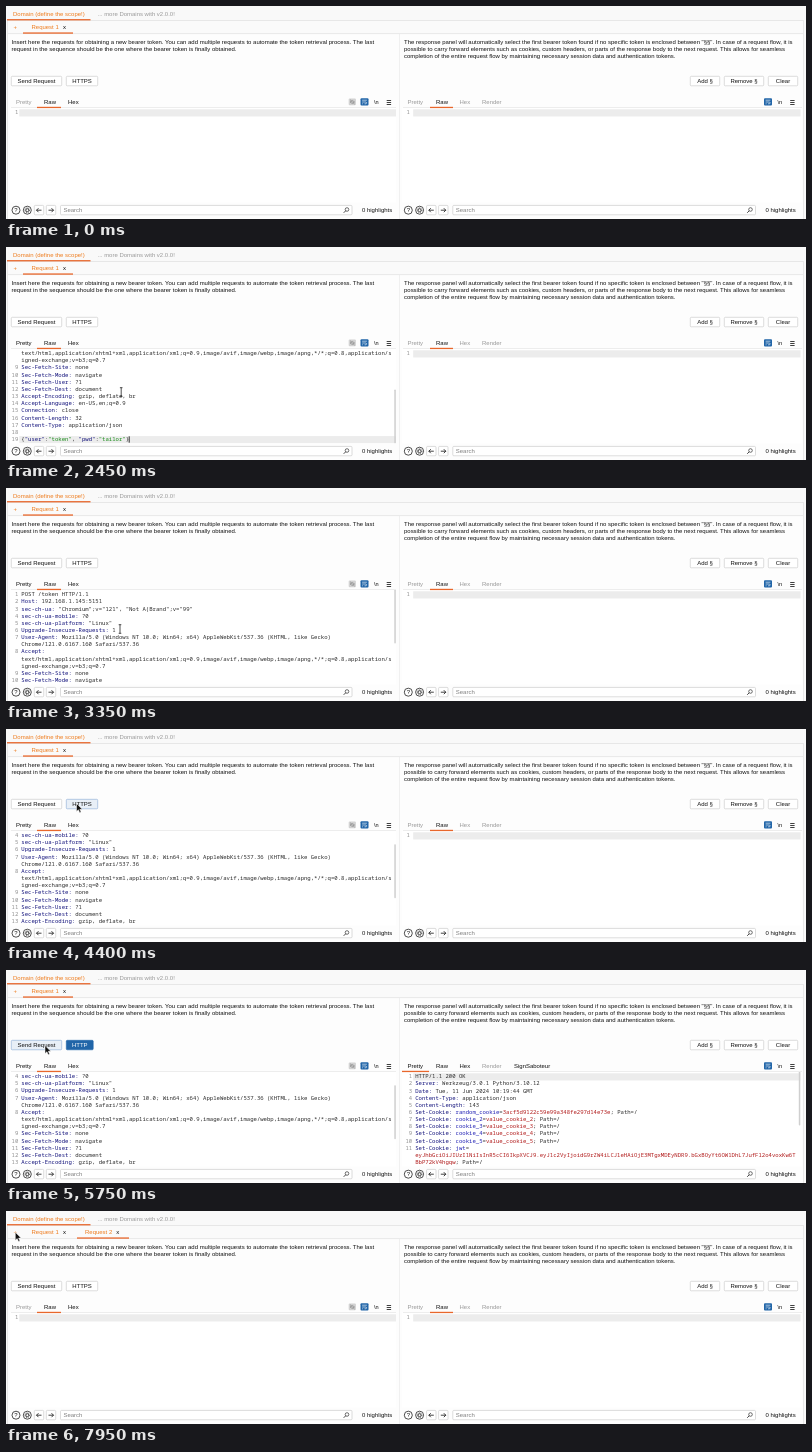
Write an HTML page that moves like this. It is 800 px wide and 213 px high and loops after 8000 ms.

```html
<!DOCTYPE html>
<html lang="en">
<head>
<meta charset="utf-8">
<title>Token request panel</title>
<style>
html, body { margin: 0; width: 100%; height: 100%; overflow: hidden; background: #fafafa; }
svg { display: block; width: 100vw; height: 100vh; }
text { font: 5.97px "Liberation Sans", Arial, sans-serif; fill: #111; white-space: pre; }
.code text { font: 5.61px "Noto Sans Mono", monospace; fill: #2a2a2a; }
.code .num { fill: #8c8c8c; text-anchor: end; }
.code .name { fill: #10107a; }
.code .key { fill: #2020b4; }
.code .val { fill: #b01818; }
.code .str { fill: #168a16; }
.plain .json tspan { fill: #2a2a2a; }
.mid { text-anchor: middle; }
</style>
</head>
<body>
<svg id="stage" viewBox="0 0 800 213" preserveAspectRatio="none">
  <clipPath id="leftClip"><rect x="4" y="102" width="386" height="94.5"/></clipPath>
  <clipPath id="rightClip"><rect x="396" y="102" width="400" height="94.5"/></clipPath>
</svg>
<script>
const LOOP = 8000, STEP = 50, ROW = 7.15, TOP = 101.5, VIEW = 95;
const ORANGE = '#e8672c', LABEL = '#ee7b1c', DARK = '#111', FADED = '#999', BLUE = '#2165a8', EDGE = '#c4c4c4';
const stage = document.getElementById('stage');

function add(tag, attrs, parent = stage) {
  const node = document.createElementNS('http://www.w3.org/2000/svg', tag);
  set(node, attrs);
  parent.appendChild(node);
  return node;
}
function set(node, attrs) {
  for (const k in attrs) node.setAttribute(k, attrs[k]);
}
function show(node, on) {
  node.style.display = on ? '' : 'none';
}
function label(x, y, str, fill = DARK, parent = stage, cls = '') {
  const node = add('text', { x, y, class: cls, style: `fill:${fill}` }, parent);
  node.textContent = str;
  return node;
}
function box(x, y, width, height, fill, stroke = 'none', parent = stage, rx = 0) {
  return add('rect', { x, y, width, height, fill, stroke, rx, 'stroke-width': 0.6 }, parent);
}
function line(d, stroke = DARK, width = 0.7, parent = stage) {
  return add('path', { d, stroke, fill: 'none', 'stroke-width': width }, parent);
}
function button(x, w, str) {
  const g = add('g', {});
  const face = box(x + 0.3, 70.3, w - 0.6, 9.5, '#fff', EDGE, g, 1);
  const text = label(x + w / 2, 77.2, str, DARK, g, 'mid');
  return { g, face, text };
}
function paint(btn, over, focused) {
  set(btn.face, { fill: over ? '#e8eff7' : '#fff', stroke: over || focused ? '#86a8d4' : EDGE });
}

// Page frame and the two rows of tabs
box(0, 0, 800, 213, '#f9f9f9');
box(1.5, 14.5, 796, 200, '#fafafa', '#dcdcdc');
box(2, 28, 795, 186, '#fdfdfd');
line('M2 27.6H797', '#dedede', 0.6);
line('M393.5 28V213', '#eaeaea', 0.7);
label(7, 9.8, 'Domain (define the scope!)', LABEL);
label(91.5, 9.8, '... more Domains with v2.0.0!', FADED);
box(1, 13.1, 83.5, 1.3, ORANGE);
label(7.6, 22.7, '+', LABEL);
label(25.5, 22.7, 'Request 1', LABEL);
label(57, 22.7, 'x');
const mark = box(17, 26.4, 50, 1.3, ORANGE);
const second = add('g', {});
label(79, 22.7, 'Request 2', LABEL, second);
label(110.3, 22.7, 'x', DARK, second);

// Introductory text
[
  'Insert here the requests for obtaining a new bearer token. You can add multiple requests to automate the token retrieval process. The last',
  'request in the sequence should be the one where the bearer token is finally obtained.'
].forEach((s, i) => label(5.5, 37.6 + i * 7.1, s));
[
  'The response panel will automatically select the first bearer token found if no specific token is enclosed between "§§". In case of a request flow, it is',
  'possible to carry forward elements such as cookies, custom headers, or parts of the response body to the next request. This allows for seamless',
  'completion of the entire request flow by maintaining necessary session data and authentication tokens.'
].forEach((s, i) => label(398, 37.6 + i * 7.1, s));

const send = button(5, 51, 'Send Request');
const https = button(60, 32, 'HTTPS');
const http = button(60, 27.5, 'HTTP');
set(http.face, { fill: BLUE, stroke: BLUE });
http.text.style.fill = '#fff';
button(684, 30, 'Add §');
button(718, 40, 'Remove §');
button(762, 30, 'Clear');

// Editors and their tabs
box(4, 101.5, 386, 95, '#fff');
box(396, 101.5, 400, 95, '#fff');
line('M5 101.5H390M397 101.5H796', '#e2e2e2', 0.6);
const prettyReq = label(10, 98.2, 'Pretty');
label(38, 98.2, 'Raw');
label(62, 98.2, 'Hex');
box(31, 100.8, 24, 1.3, ORANGE);
const prettyRes = label(401.5, 98.2, 'Pretty');
label(430, 98.2, 'Raw');
const hexRes = label(453.5, 98.2, 'Hex');
label(476, 98.2, 'Render', FADED);
const extraTab = label(508, 98.2, 'SignSaboteur');
const resMark = box(424, 100.8, 23, 1.3, ORANGE);

function viewIcons(x) {
  box(x - 4, 92.3, 8, 7.2, BLUE, 'none', stage, 1);
  line(`M${x - 2.4} 94.2h4.8m-4.8 1.8h4q1.3 .9 0 1.8h-1.6m-2.4 0h1`, '#fff', 0.6);
  label(x + 9.4, 98, '\\n').style.fontSize = '5.6px';
  line(`M${x + 22.2} 94.5h4.4m-4.4 2h4.4m-4.4 2h4.4`, DARK, 0.8);
}
viewIcons(358.5);
viewIcons(762);
box(342.7, 92.5, 7.2, 6.8, '#d2d2d2', 'none', stage, 1);
line('M344 96q2.3 -3 4.6 0q-2.3 3 -4.6 0M344 93.6l4.7 4.6', '#7d7d7d', 0.6);

// Bottom bars
function footer(x, end) {
  for (const cx of [x + 10, x + 21.3])
    add('circle', { cx, cy: 204.2, r: 4, fill: '#fff', stroke: '#222', 'stroke-width': 0.8 });
  label(x + 10, 206.4, '?', DARK, stage, 'mid');
  add('circle', { cx: x + 21.3, cy: 204.2, r: 1.5, fill: 'none', stroke: '#222', 'stroke-width': 0.8 });
  add('circle', { cx: x + 21.3, cy: 204.2, r: 2.3, fill: 'none', stroke: '#222', 'stroke-width': 0.8, 'stroke-dasharray': '.9 .9' });
  for (const [cx, dir] of [[x + 33, -1], [x + 45, 1]]) {
    box(cx - 4.7, 199.4, 9.4, 9.4, '#fff', EDGE, stage, 1);
    line(`M${cx - 2.5 * dir} 204.2h${5 * dir}m${-2 * dir} -2l${2 * dir} 2l${-2 * dir} 2`, DARK, 0.8);
  }
  box(x + 54.5, 199.4, end - x - 54.5, 9.4, '#fff', EDGE, stage, 1);
  label(x + 57.5, 206.3, 'Search', '#7f7f7f');
  add('circle', { cx: end - 5, cy: 203.5, r: 1.8, fill: 'none', stroke: '#333', 'stroke-width': 0.7 });
  line(`M${end - 6.3} 204.8l-2 2`, '#333', 0.9);
  label(end + 10, 206.3, '0 highlights');
}
footer(0, 346);
footer(392.3, 749.5);

// Code rows: a line break marks where a long line wraps
const request = [
  'POST /token HTTP/1.1',
  'Host: 192.168.1.145:5151',
  'sec-ch-ua: "Chromium";v="121", "Not A(Brand";v="99"',
  'sec-ch-ua-mobile: ?0',
  'sec-ch-ua-platform: "Linux"',
  'Upgrade-Insecure-Requests: 1',
  'User-Agent: Mozilla/5.0 (Windows NT 10.0; Win64; x64) AppleWebKit/537.36 (KHTML, like Gecko)\nChrome/121.0.6167.160 Safari/537.36',
  'Accept:\ntext/html,application/xhtml+xml,application/xml;q=0.9,image/avif,image/webp,image/apng,*/*;q=0.8,application/s\nigned-exchange;v=b3;q=0.7',
  'Sec-Fetch-Site: none',
  'Sec-Fetch-Mode: navigate',
  'Sec-Fetch-User: ?1',
  'Sec-Fetch-Dest: document',
  'Accept-Encoding: gzip, deflate, br',
  'Accept-Language: en-US,en;q=0.9',
  'Connection: close',
  'Content-Length: 32',
  'Content-Type: application/json',
  '',
  '{"user":"token", "pwd":"tailor"}'
];
const response = [
  'HTTP/1.1 200 OK',
  'Server: Werkzeug/3.0.1 Python/3.10.12',
  'Date: Tue, 11 Jun 2024 10:19:44 GMT',
  'Content-Type: application/json',
  'Content-Length: 143',
  'Set-Cookie: random_cookie=3acf5d9122c59e99a348fe297d14e73e; Path=/',
  ...[2, 3, 4, 5].map(n => `Set-Cookie: cookie_${n}=value_cookie_${n}; Path=/`),
  'Set-Cookie: jwt=\neyJhbGciOiJIUzI1NiIsInR5cCI6IkpXVCJ9.eyJ1c2VyIjoidG9rZW4iLCJleHAiOjE3MTgxMDEyNDR9.bGxBOyYt6OW1DhL7JufFl2o4voxKw6T\nBbP72kV4hgqw; Path=/'
];

function tokens(row, wrapped, cookie) {
  if (row[0] === '{') return row.split(/("\w+"(?=:)|"\w+")/).map((s, i, all) =>
    [s, i % 2 ? (all[i + 1][0] === ':' ? 'name' : 'str') : '']);
  if (wrapped) {
    const cut = (row + ';').indexOf(';');
    return cookie ? [[row.slice(0, cut), 'val'], [row.slice(cut), '']] : [[row, '']];
  }
  const m = row.match(/^([\w-]+:)(.*)$/);
  if (!m) return [[row, '']];
  const c = cookie && m[2].match(/^( \w+)=([^;]*)(.*)$/);
  return [[m[1], 'name'], ...(c ? [[c[1], 'key'], ['=', ''], [c[2], 'val'], [c[3], '']] : [[m[2], '']])];
}

function codeBlock(parent, x, lines) {
  let row = 0;
  lines.forEach((str, n) => str.split('\n').forEach((part, i) => {
    const y = TOP + 6.7 + row++ * ROW;
    if (!i) label(x - 3, y, n + 1, '#8c8c8c', parent, 'num');
    const text = add('text', { x, y, class: part[0] === '{' ? 'json' : '' }, parent);
    for (const [s, cls] of tokens(part, i > 0, str.startsWith('Set-Cookie')))
      add('tspan', { class: cls }, text).textContent = s;
  }));
  return row;
}

function pane(clip, x, end, lines) {
  const g = add('g', { 'clip-path': `url(#${clip})`, class: 'code' });
  const body = add('g', {}, g);
  const band = box(x - 2, TOP + 1.8, end - x + 2, ROW, '#ececec', 'none', body);
  const empty = add('g', {}, body), full = add('g', {}, body);
  label(x - 3, TOP + 6.7, 1, '#8c8c8c', empty, 'num');
  const rows = codeBlock(full, x, lines);
  const thumb = box(end - 1.7, TOP, 1.5, 54, '#cfcfcf', 'none', g, 0.7);
  return { g, body, band, empty, full, rows, thumb };
}
const left = pane('leftClip', 15.3, 390, request);
const right = pane('rightClip', 409.2, 794.5, response);
set(right.empty, { transform: 'translate(-2.2 0)' });
const caret = line('M0 0v6.4', '#000', 0.8, left.body);

const arrow = add('path', { d: 'M0 0V8L1.9 6.3 3.2 9.2 4.6 8.6 3.3 5.8H5.8Z', fill: '#111', stroke: '#fff', 'stroke-width': 0.5 });
const beam = line('M-1.3 -4.3H1.3M0 -4.3V4.3M-1.3 4.3H1.3', '#222', 0.8);

// Pointer stops: time, x, y
const path = [
  [250, 366, 9], [1000, 118, 115.5], [2200, 118, 115.5], [2450, 115.2, 145],
  [2650, 115.2, 145], [2850, 114, 141], [3500, 114, 141], [4150, 42, 73.5], [4400, 70.5, 74.5],
  [4750, 70.5, 74.5], [5050, 39, 78], [5200, 39.3, 77.5], [5400, 39, 75.5], [6050, 39, 75.5],
  [6650, 10, 5], [6950, 10, 5], [7000, 9, -0.5], [7300, 35, 33], [7550, 9.3, 21.3], [LOOP, 9.3, 21.3]
];
// Request scroll, in rows
const scrolls = [[0, 9], [2650, 7], [2700, 4], [2750, 2], [2850, 0], [3400, 1], [3450, 3]];

function pointer(t) {
  const i = Math.max(1, path.findIndex(p => p[0] > t));
  const [a, b] = [path[i - 1], path[i]];
  const u = Math.max(0, (t - a[0]) / (b[0] - a[0]));
  const e = u * u * (3 - 2 * u);
  return [a[1] + (b[1] - a[1]) * e, a[2] + (b[2] - a[2]) * e];
}

function draw(time) {
  const t = Math.floor(time % LOOP / STEP) * STEP;
  const fresh = t >= 7950;
  const pasted = t >= 1650 && !fresh;
  const answered = t >= 5650 && !fresh;
  const secure = t < 4600 || fresh;
  const scroll = pasted ? scrolls.filter(s => s[0] <= t).pop()[1] : 0;

  show(second, fresh);
  set(mark, { x: fresh ? 71 : 17, width: fresh ? 52 : 50 });
  show(https.g, secure);
  show(http.g, !secure);

  stage.classList.toggle('plain', t < 2300);
  prettyReq.style.fill = t >= 2300 && !fresh ? DARK : FADED;
  show(left.empty, !pasted);
  show(left.full, pasted);
  show(left.thumb, pasted);
  set(left.body, { transform: `translate(0 ${-scroll * ROW})` });
  set(left.band, { y: TOP + 1.8 + (pasted ? left.rows - 1 : 0) * ROW });
  set(left.thumb, { y: TOP + scroll / 9 * (VIEW - 54) });
  show(caret, t >= 1150 && !fresh);
  set(caret, { transform: pasted ? `translate(123.2 ${TOP + 2 + (left.rows - 1) * ROW})` : `translate(15.6 ${TOP + 2})` });

  show(right.empty, !answered);
  show(right.full, answered);
  show(right.thumb, answered);
  show(extraTab, answered);
  prettyRes.style.fill = hexRes.style.fill = answered ? DARK : FADED;
  set(resMark, answered ? { x: 396, width: 27 } : { x: 424, width: 23 });

  const [x, y] = pointer(t);
  const inText = x < 390 && y > 102;
  const inButton = y > 70 && y < 80;
  paint(send, inButton && x > 5 && x < 56, answered);
  paint(https, inButton && x > 60 && x < 92, false);
  show(arrow, t >= 250 && !inText);
  show(beam, t >= 250 && inText);
  set(inText ? beam : arrow, { transform: `translate(${x} ${y})` });
}

function tick() {
  draw(performance.now());
  requestAnimationFrame(tick);
}
tick();
</script>
</body>
</html>
```
